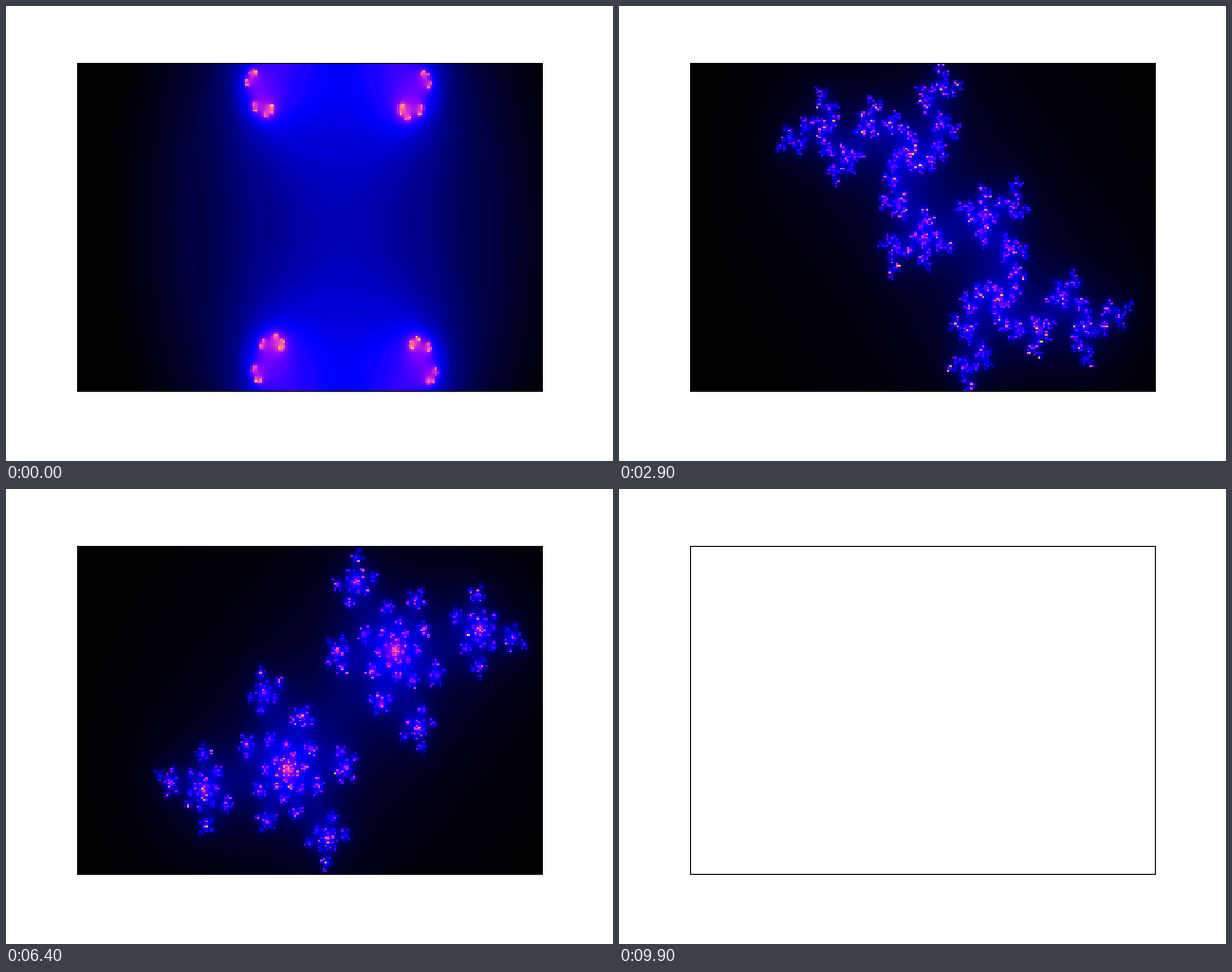
An HTML page with a canvas that plays this animation: 640x480 px, repeating every 10 s.

```html
<!DOCTYPE html>
<html lang="en">
<head>
<meta charset="utf-8">
<title>Julia sets along a circle</title>
<style>
  html, body { margin: 0; width: 100%; height: 100%; overflow: hidden; background: #fff; }
  canvas { display: block; }
</style>
</head>
<body>
<canvas id="stage" width="640" height="480"></canvas>
<script>
const ctx = document.getElementById('stage').getContext('2d');

const LOOP = 10000, STEP = 100, TURN = 99;
const RADIUS = 0.7885, MAX_ITER = 256, N = 200;
const BOX = { left: 75, top: 60, w: 490, h: 346 };
const VIEW = { x: -2, y: 1, w: 3.5, h: 2 };

// Smoothed number of steps until |z| passes 2.
function escapeTime(x, y, cx, cy) {
  for (let n = 0; n < MAX_ITER; n++) {
    const xx = x * x, yy = y * y;
    if (xx + yy > 4) {
      return Math.max(0, n - Math.log2(Math.log2(xx + yy) / 2));
    }
    y = 2 * x * y + cy;
    x = xx - yy + cx;
  }
  return MAX_ITER;
}

// Upper end of the colour scale, rounded up to a whole tick.
function scaleTop(max) {
  const power = 10 ** Math.floor(Math.log10(max));
  const room = 20 / (max / power);
  const tick = room > 10 ? 0.2 : room > 4 ? 0.5 : 1;
  return Math.ceil(max / (tick * power) - 1e-9) * tick * power;
}

function juliaField(angle) {
  const cx = RADIUS * Math.cos(angle), cy = RADIUS * Math.sin(angle);
  const field = new Float32Array(N * N);
  let max = 0;
  for (let j = 0; j < N; j++) {
    const y = VIEW.y - VIEW.h * j / (N - 1);
    for (let i = 0; i < N; i++) {
      const x = VIEW.x + VIEW.w * i / (N - 1);
      const v = escapeTime(x, y, cx, cy);
      field[j * N + i] = v;
      if (v > max) max = v;
    }
  }
  const top = scaleTop(max);
  return field.map(v => v / top);
}

// Black - blue - violet - yellow - white.
const red = g => g / 0.32 - 0.78125;
const green = g => 2 * g - 0.84;
const blue = g => g < 0.25 ? 4 * g : g < 0.42 ? 1 : g < 0.92 ? 1.84 - 2 * g : g / 0.08 - 11.5;

const SHADES = 4096;
const palette = new Uint8ClampedArray((SHADES + 1) * 3);
for (let s = 0; s <= SHADES; s++) {
  [red, green, blue].forEach((f, k) => { palette[s * 3 + k] = 255 * f(s / SHADES); });
}

// Grid line that colours each pixel along one side of the box.
function sampleIndex(length, inclusive) {
  return Array.from({ length: length - 1 }, (_, p) => {
    let i = 0;
    while (i < N - 1) {
      const edge = Math.round(length * i / (N - 1));
      if (inclusive ? edge >= p + 1 : edge > p + 1) break;
      i++;
    }
    return i;
  });
}
const cols = sampleIndex(BOX.w, false);
const rows = sampleIndex(BOX.h, true);
const image = ctx.createImageData(cols.length, rows.length);
const fields = [];

function drawField(field) {
  const out = image.data;
  let o = 0;
  for (const j of rows) {
    for (const i of cols) {
      const s = Math.round(field[j * N + i] * SHADES) * 3;
      out[o++] = palette[s];
      out[o++] = palette[s + 1];
      out[o++] = palette[s + 2];
      out[o++] = 255;
    }
  }
  ctx.putImageData(image, BOX.left + 1, BOX.top + 1);
}

function draw(step) {
  ctx.fillStyle = '#fff';
  ctx.fillRect(0, 0, 640, 480);
  // The last step shows only the empty box.
  if (step < TURN) {
    fields[step] ??= juliaField(2 * Math.PI * (step + 1) / TURN);
    drawField(fields[step]);
  }
  ctx.strokeStyle = '#000';
  ctx.lineWidth = 1;
  ctx.strokeRect(BOX.left + 0.5, BOX.top + 0.5, BOX.w, BOX.h);
}

const start = performance.now();
let shown = -1;
function tick() {
  const step = Math.floor(((performance.now() - start) % LOOP) / STEP);
  if (step !== shown) draw(shown = step);
  requestAnimationFrame(tick);
}
tick();
</script>
</body>
</html>
```
